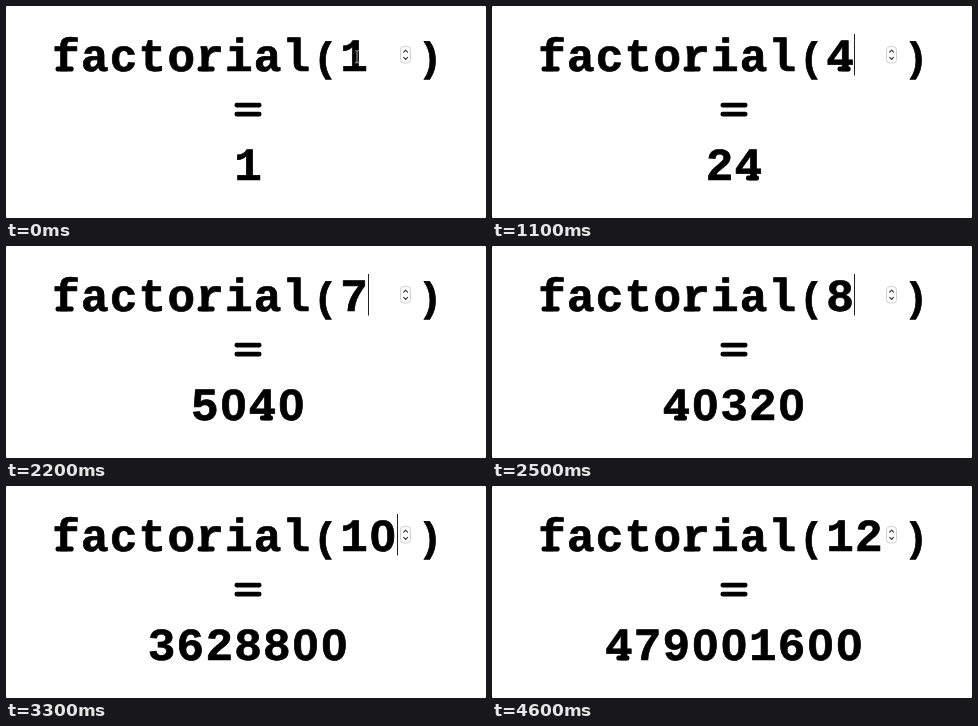
These frames come from a looping animation (480 px wide and 212 px high, 5000 ms). An HTML page:

```html
<!DOCTYPE html>
<html lang="en">
<head>
<meta charset="utf-8">
<title>factorial</title>
<style>
  html, body { margin: 0; width: 100%; height: 100%; overflow: hidden; background: #aaa; }
  svg { display: block; width: 480px; height: 212px; }
  text {
    font: bold 46px "Liberation Mono", "Courier New", monospace;
    text-rendering: geometricPrecision;
    white-space: pre;
    stroke: #000;
    stroke-width: .7;
    stroke-linejoin: round;
  }
  .spinner rect { fill: #fff; stroke: #c4c4c4; stroke-width: .8; }
  .spinner path { fill: none; stroke: #333; stroke-width: 1.1; stroke-linecap: round; stroke-linejoin: round; }
  #pointer { fill: none; stroke: #8a8a8a; stroke-width: 1.2; }
</style>
</head>
<body>
<svg viewBox="0 0 480 212">
  <rect width="480" height="212" rx="2" fill="#fff"/>
  <g id="name"></g>
  <g id="open"></g>
  <g id="input"></g>
  <g id="close"></g>
  <g role="img" aria-label="=">
    <rect x="228.5" y="96.7" width="27" height="4.8" rx="2.2"/>
    <rect x="228.5" y="105.7" width="27" height="4.8" rx="2.2"/>
  </g>
  <g id="result"></g>
  <rect id="caret" y="28" width="1" height="41.5" fill="#222"/>
  <g class="spinner">
    <rect x="394.5" y="40.5" width="10" height="16.5" rx="3.5"/>
    <path d="M397.7 46.2l1.9-2l1.9 2M397.7 51.3l1.9 2l1.9-2"/>
  </g>
  <path id="pointer" d="M349 44.5q2 0 2 2v8.5q0 2-2 2M353 44.5q-2 0-2 2v8.5q0 2 2 2"/>
</svg>
<script>
const LOOP = 5000, CELL = 28.8, CENTER = 242, INPUT_X = 333.6;
const TOP_LINE = 65, RESULT_LINE = 174;
const TEXT_SIZE = 46, PAREN_SIZE = 41;
const STEPS = [0, 400, 800, 1100, 1500, 1800, 2200, 2500, 2900, 3300, 3700, 4100];
const CARET_ON = 100, POINTER_OFF = 200, CARET_OFF = 4600;
// Slab feet for characters that lack them: left and right edge within the cell
const FEET = { f: [4, 22], r: [2, 19], 4: [12, 25] };

const byId = id => document.getElementById(id);
const caret = byId("caret"), pointer = byId("pointer");

function detail(char, x, baseline) {
  if (char === "0") // open the dotted zero
    return `<ellipse cx="${x + CELL / 2}" cy="${baseline - 15.2}" rx="3.8" ry="7" fill="#fff"/>`;
  if (!FEET[char]) return "";
  const [left, right] = FEET[char];
  return `<rect x="${x + left}" y="${baseline - 4.6}" width="${right - left}" height="5" rx="2"/>`;
}

// Sets text in fixed cells, each glyph centred in its cell
function write(id, string, x, baseline, size = TEXT_SIZE) {
  const gap = CELL - size * 0.6;
  const details = [...string].map((char, i) => detail(char, x + i * CELL, baseline));
  byId(id).innerHTML =
    `<text x="${x + gap / 2}" y="${baseline}" style="font-size:${size}px;letter-spacing:${gap}px">${string}</text>`
    + details.join("");
}

const factorial = n => n < 2 ? 1 : n * factorial(n - 1);
const show = (node, visible) => node.setAttribute("visibility", visible ? "visible" : "hidden");

write("name", "factorial", INPUT_X - 10 * CELL, TOP_LINE);
write("open", "(", INPUT_X - CELL, TOP_LINE, PAREN_SIZE);
write("close", ")", 409.6, TOP_LINE, PAREN_SIZE);

let shown = 0;
function draw(now) {
  const time = now % LOOP;
  const n = STEPS.filter(start => start <= time).length;
  if (n !== shown) {
    shown = n;
    const digits = String(n), product = String(factorial(n));
    write("input", digits, INPUT_X, TOP_LINE);
    write("result", product, CENTER - product.length * CELL / 2, RESULT_LINE);
    caret.setAttribute("x", Math.floor(INPUT_X + digits.length * CELL));
  }
  show(caret, time >= CARET_ON && time < CARET_OFF);
  show(pointer, time < POINTER_OFF);
}

const origin = performance.now();
function tick() {
  draw(performance.now() - origin);
  requestAnimationFrame(tick);
}
tick();
</script>
</body>
</html>
```
